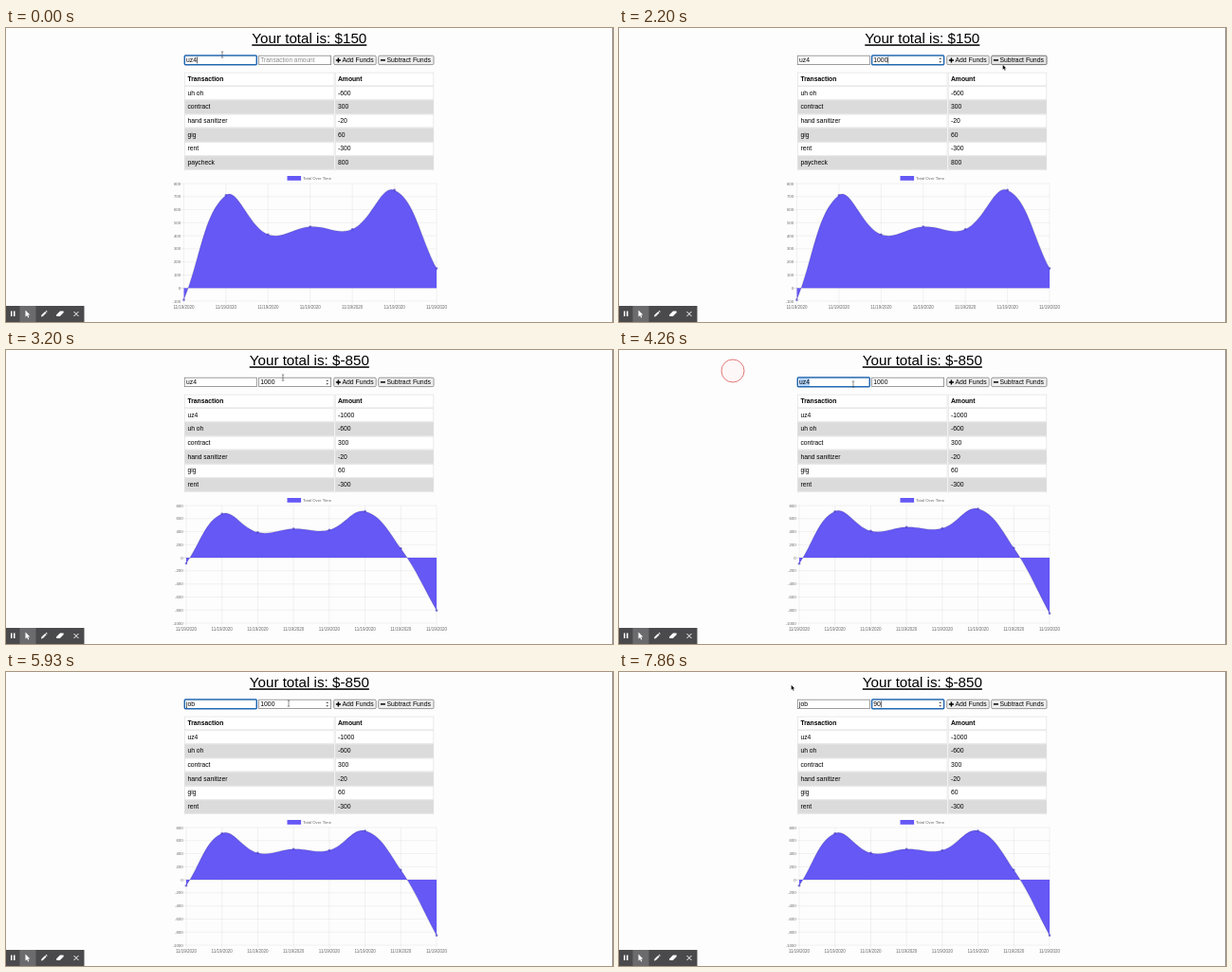
An HTML page that plays this animation: 640 by 310 pixels, repeating every 8 s.

```html
<!DOCTYPE html>
<html lang="en">
<head>
<meta charset="utf-8">
<title>Budget tracker</title>
<style>
  html, body { margin: 0; width: 100%; height: 100%; overflow: hidden; background: #fdfdfd; }
  svg { display: block; width: 640px; height: 310px; }
  text { font-family: "Liberation Sans", Arial, sans-serif; white-space: pre; }
</style>
</head>
<body>
<svg id="stage" viewBox="0 0 640 310">
  <clipPath id="list"><rect x="180" y="46" width="280" height="104.5"/></clipPath>
  <g id="scene"></g>
  <g id="toolbar">
    <rect x="639" width="1" height="310" fill="#999"/>
    <rect y="293" width="82.5" height="17" fill="#4a4a4c"/>
    <rect x="14.5" y="293" width="17" height="17" fill="#6b6b6d"/>
    <g fill="#fff">
      <path d="M5 298.500h1.500v5.500H5zM8 298.500h1.500v5.500H8z"/>
      <path d="M20.500 297.500v7l1.600-1.500 1.200 2.400 1-.5-1.100-2.300h2.100z"/>
      <path d="M37 304.500l.5-1.900 3.700-3.700 1.400 1.400-3.700 3.700zM41.700 298.400l.7-.6 1.300 1.300-.6.700z"/>
      <path d="M53 302.500l4-4h3.500l.3 1.500-4 4h-3.400z"/>
    </g>
    <path d="M71.500 299l5 5m0-5l-5 5" stroke="#fff" stroke-width="1"/>
  </g>
</svg>
<script>
const LOOP = 8000, UPDATE = 2680;
const ITEM = 'uz4', PURPLE = '#6558f5';
const rows = [['uh oh', -600], ['contract', 300], ['hand sanitizer', -20], ['gig', 60],
  ['rent', -300], ['paycheck', 800], ['', '']];
const totals = [-90, 710, 410, 470, 450, 750, 150];

// Pointer: time, x, y
const pointer = [[0, 228, 28], [200, 234, 29], [620, 290, 34], [2050, 300, 36], [2200, 405, 39],
  [2400, 417, 32], [2860, 417, 32], [3200, 292, 29], [3560, 247, 36], [4600, 247, 36],
  [4601, 120, 19], [5400, 120, 19], [5860, 298, 33], [6500, 298, 33], [6501, 182, 14]];
// Mouse presses: down, up, start x and y, end x and y
const presses = [[700, 860, 290, 34, 290, 34], [2530, 2665, 417, 32, 417, 32],
  [3860, 4560, 247, 36, 120, 22], [6060, 6460, 298, 33, 182, 16]];
const hidden = [[1130, 2050], [4800, 5400]];
const amountKeys = [1200, 1500, 1650, 1800], nameKeys = [4950, 5150, 5300], newKeys = [6600, 6830];

const clamp = (v, a, b) => Math.min(b, Math.max(a, v));
const during = (t, a, b) => t >= a && t < b;
const typed = (word, keys, t) => word.slice(0, keys.filter(k => k <= t).length);

function pointerAt(t) {
  const i = pointer.findIndex(p => p[0] > t);
  if (i < 0) return pointer.at(-1).slice(1);
  const [a, b] = [pointer[i - 1], pointer[i]];
  const p = (t - a[0]) / (b[0] - a[0]), e = p * p * (3 - 2 * p);
  return [a[1] + (b[1] - a[1]) * e, a[2] + (b[2] - a[2]) * e];
}

const rect = (x, y, w, h, fill, more = '') =>
  `<rect x="${x}" y="${y}" width="${w}" height="${h}" fill="${fill}" ${more}/>`;
const text = (s, x, y, size, more = '') => `<text x="${x}" y="${y}" font-size="${size}" ${more}>${s}</text>`;
const line = (x1, y1, x2, y2, alpha) =>
  `<path d="M${x1} ${y1}L${x2} ${y2}" stroke="#000" stroke-opacity="${alpha}" stroke-width=".5"/>`;

let measure = document.createElement('canvas').getContext('2d');
measure.font = '68px "Liberation Sans", Arial, sans-serif';
const widthOf = s => measure.measureText(s).width / 10;

function field(x, value, { focus, selected, caret, hint = '', spin }) {
  const w = widthOf(value);
  let out = focus
    ? rect(x, 29, 76, 9.8, '#fff', 'rx="1" stroke="#2469b3" stroke-width="1.5"')
    : rect(x, 29.2, 76, 9.4, '#fff', 'stroke="#858585" stroke-width=".8"');
  if (selected) out += rect(x + 1.6, 30.2, w + .2, 7.6, '#b0d2fb');
  out += value ? text(value, x + 1.7, 36.3, 6.8) : text(hint, x + 1.7, 36.2, 6.5, 'fill="#8a8a8a"');
  if (caret) out += rect(x + 1.8 + w, 30.4, .6, 7, '#000');
  if (spin) out += `<path d="M${x + 70.8} 33l1.300-1.700 1.300 1.700zM${x + 70.8} 35l1.300 1.700 1.300-1.700z" fill="#555"/>`;
  return out;
}

function button(x, w, label, plus, state) {
  const fill = ['#efefef', '#e5e5e5', '#d4d4d4'][state], edge = state ? '#555' : '#808080';
  return rect(x, 29.2, w, 9.4, fill, `rx="1.200" stroke="${edge}" stroke-width=".8"`) +
    `<path d="M${x + 2.2} 33.900h5${plus ? 'm-2.500-2.500v5' : ''}" stroke="#000" stroke-width="1.500"/>` +
    text(label, x + 8.8, 36.3, 6.85);
}

function table(items) {
  let out = '';
  [['Transaction', 'Amount'], ...items].forEach(([name, amount], i) => {
    const y = 47.1 + 14.67 * i, fill = i && i % 2 == 0 ? '#dadbda' : '#fff';
    const bold = i ? '' : 'font-weight="bold"';
    out += rect(188.4, y, 157.6, 13.8, fill, 'stroke="#dcdcdc" stroke-width=".6"') +
      rect(347.2, y, 103.6, 13.8, fill, 'stroke="#dcdcdc" stroke-width=".6"') +
      text(name, 191.4, y + 9, 6.75, bold) + text(amount, 350, y + 9, 6.75, bold);
  });
  return `<g clip-path="url(#list)">${out}</g>`;
}

// Smooth area chart whose values grow out of the zero line
function chart(values, left, low, step, grow) {
  const top = 164, bottom = 288, right = 454;
  const toY = v => bottom - (v - low) / (800 - low) * (bottom - top);
  const zero = toY(0), gap = (right - left) / (values.length - 1);
  const pts = values.map((v, i) => [left + gap * i, toY(v)]);
  const place = ([x, y]) => `${x.toFixed(2)} ${(zero + (y - zero) * grow).toFixed(2)}`;
  const controls = pts.map((p, i) => {
    const a = pts[i - 1] || p, b = pts[i + 1] || p;
    const da = Math.hypot(p[0] - a[0], p[1] - a[1]), db = Math.hypot(b[0] - p[0], b[1] - p[1]);
    const handle = k => [clamp(p[0] + k * (b[0] - a[0]), left, right), clamp(p[1] + k * (b[1] - a[1]), top, bottom)];
    return [handle(-.4 * da / (da + db)), handle(.4 * db / (da + db))];
  });
  let curve = 'M' + place(pts[0]);
  for (let i = 1; i < pts.length; i++)
    curve += `C${place(controls[i - 1][1])} ${place(controls[i][0])} ${place(pts[i])}`;

  let out = '';
  for (let v = low; v <= 800; v += step) {
    const y = toY(v);
    out += line(left - 3.5, y, right, y, v ? .1 : .25) +
      text(v, left - 3.4, y + 1.5, 4.3, 'fill="#666" text-anchor="end"');
  }
  for (const [x] of pts)
    out += line(x, top, x, bottom + 3.5, .1) +
      text('11/19/2020', x, 295.6, 4.5, 'fill="#666" text-anchor="middle"');
  out += `<path d="${curve}L${right} ${zero}L${left} ${zero}Z" fill="${PURPLE}"/>` +
    `<path d="${curve}" fill="none" stroke="#000" stroke-opacity=".1" stroke-width="1.300"/>`;
  for (const p of pts) {
    const [x, y] = place(p).split(' ');
    out += `<circle cx="${x}" cy="${y}" r="1.300" fill="#4a40c8" fill-opacity=".7"/>`;
  }
  return out + rect(296.5, 156, 14.6, 4.8, PURPLE) + text('Total Over Time', 313, 160, 4.3, 'fill="#666"');
}

function cursor(x, y, beam) {
  return beam
    ? `<path d="M${x - 1.2} ${y - 3.2}q1.200 0 1.200 .8v5q0 .8-1.200 .8m2.400-6.600q-1.200 0-1.200 .8m0 5q0 .8 1.200 .8" fill="none" stroke="#444" stroke-width=".6"/>`
    : `<path d="M${x - .5} ${y - .5}v5.600l1.300-1.100 .9 2 1-.4-.9-2h1.700z" fill="#000" stroke="#fff" stroke-width=".4"/>`;
}

function ring(t) {
  return presses.map(([down, up, x1, y1, x2, y2]) => {
    if (!during(t, down, up + 190)) return '';
    const move = clamp((t - down - 60) / 280, 0, 1);
    const r = 12 * Math.min(1, (t - down + 40) / 130) * (1 - clamp((t - up) / 190, 0, 1));
    return `<circle cx="${x1 + (x2 - x1) * move}" cy="${y1 + (y2 - y1) * move}" r="${r}"
      fill="#f66" fill-opacity=".04" stroke="#e06a6a" stroke-width=".9"/>`;
  }).join('');
}

function draw(t) {
  const added = t >= UPDATE;
  const nameFocus = t < 700 || during(t, 3860, 6060);
  const amountFocus = during(t, 700, 2530) || t >= 6060;
  const name = t < nameKeys[0] ? ITEM : typed('job', nameKeys, t);
  const amount = t < newKeys[0] ? typed('1000', amountKeys, t) : typed('90', newKeys, t);
  const nameSelected = during(t, 3980, nameKeys[0]), amountSelected = during(t, 6180, newKeys[0]);

  // The caret restarts its blink at every key and click
  const last = Math.max(...[0, 700, 3860, 6060, ...amountKeys, ...nameKeys, ...newKeys].filter(k => k <= t));
  const caret = (t - last) % 1000 < 500;

  const [x, y] = pointerAt(t);
  const shown = !hidden.some(([a, b]) => during(t, a, b));
  const beam = x > 187 && x < 343 && y > 25 && y < 40;
  const overAmount = shown && beam && x > 266 && y > 28.5;
  const overSubtract = shown && x > 393 && x < 451 && y > 28 && y < 40;

  const grow = 1 - (1 - clamp((t - UPDATE) / 1000, 0, 1)) ** 4;
  document.getElementById('scene').innerHTML =
    text(`Your total is: $${added ? -850 : 150}`, 319.8, 16.3, 15.2, 'text-anchor="middle" text-decoration="underline"') +
    field(188.3, name, { focus: nameFocus, selected: nameSelected, caret: nameFocus && caret && !nameSelected }) +
    field(266.6, amount, { focus: amountFocus, selected: amountSelected, hint: 'Transaction amount',
      caret: amountFocus && caret && !amountSelected, spin: amountFocus || overAmount }) +
    button(345.7, 44.5, 'Add Funds', true, 0) +
    button(392.7, 58.3, 'Subtract Funds', false, during(t, 2530, 2760) ? 2 : overSubtract ? 1 : 0) +
    table(added ? [[ITEM, -1000], ...rows] : rows) +
    (added ? chart([...totals, -850], 190, -1000, 200, grow) : chart(totals, 187.5, -100, 100, 1)) +
    ring(t) + (shown ? cursor(x, y, beam) : '');
}

const start = performance.now();
function tick() {
  draw((performance.now() - start) % LOOP);
  requestAnimationFrame(tick);
}
tick();
</script>
</body>
</html>
```
